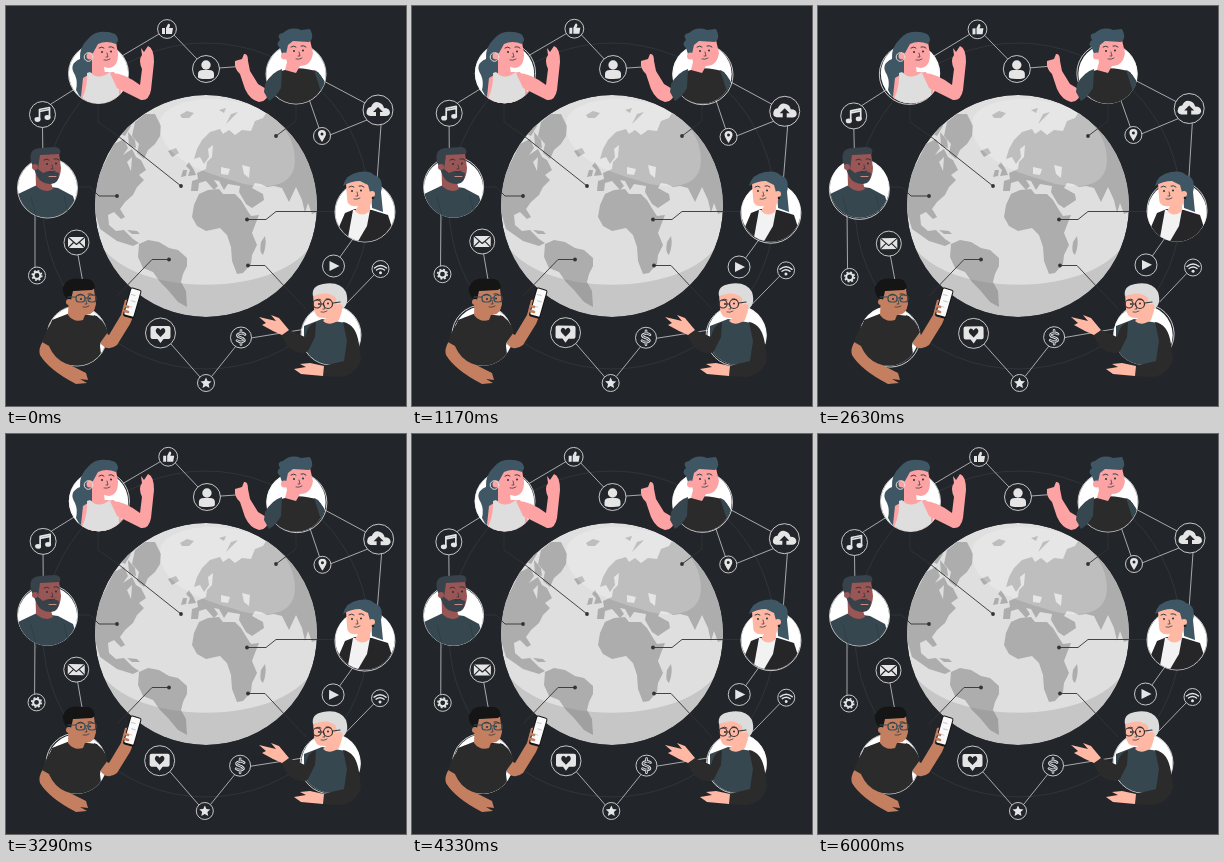
Write an HTML page that moves like this. It is 400x400 px and loops after 6.04 s.

```html
<!DOCTYPE html>
<html lang="en">
<head>
<meta charset="utf-8">
<title>Connected world</title>
<style>
html,body{margin:0;width:100%;height:100%;overflow:hidden;background:#22262b}
svg{display:block;width:100vw;height:100vh}
.line{fill:none;stroke:#333;stroke-width:.9}
.fine{fill:none;stroke-linecap:round;stroke-linejoin:round}
.pink{fill:#fda3a3}.peach{fill:#ffb8a4}.tan{fill:#c47f60}.brown{fill:#9a5555}
.slate{fill:#37474f}.hair{fill:#3f5764}.black{fill:#2b2b2b}.white{fill:#fff}
</style>
</head>
<body>
<svg viewBox="0 0 400 400">
<defs>
  <clipPath id="globe"><circle cx="200" cy="200" r="111"/></clipPath>
  <clipPath id="c1"><path d="M0 0H400V67.500H122.200A29.700 29.700 0 0 1 62.800 67.500H0Z"/></clipPath>
  <clipPath id="c2"><circle cx="290" cy="68" r="29.700"/></clipPath>
  <clipPath id="c3"><circle cx="41.500" cy="182" r="29.700"/></clipPath>
  <clipPath id="c4"><circle cx="359" cy="206" r="29.700"/></clipPath>
  <clipPath id="c5"><circle cx="71" cy="330" r="29.700"/></clipPath>
  <clipPath id="c6"><circle cx="325" cy="329" r="29.700"/></clipPath>
</defs>
<rect width="400" height="400" fill="#22262b"/>
<circle cx="200" cy="200" r="163" fill="none" stroke="#30353a"/>
<g id="orbitBack"></g>

<g clip-path="url(#globe)">
  <circle cx="200" cy="200" r="111" fill="#dfdfdf"/>
  <g fill="#adadad">
    <path d="M193 188L202 184 213 183 217 188 229 188 235 194 241 204 245 210 253 209 249 219 246 227 251 239 246 249 245 258 237 267 231 268 226 255 225 241 221 229 214 222 200 225 191 220 186 211 188 199Z"/>
    <path d="M255 236L259 230Q261 239 257 249 253 247 255 236Z"/>
    <path d="M133 238L142 234 153 236 163 242 172 244 181 252 181 260 177 268 175 276 180 285 181 301 172 296 162 284 154 276 147 266 137 262 132 251Z"/>
    <path d="M129 116L139 108 149 108 155 120 154 130 149 138 142 144 138 153 131 147 133 138 126 130Z"/>
    <path d="M108 138L118 133 122 142 117 149 126 143 130 151 135 154 140 164 133 169 138 174 131 181 127 189 119 196 114 203 119 211 115 213 108 206 102 209 103 219 110 225 118 224 127 233 133 237 127 240 111 235 94 223 87 200 92 170Z"/>
    <path d="M117 116L125 111 125 120 119 130 113 127ZM122 126L129 134 130 142 123 140Z"/>
    <path d="M188 153L191 143 196 134 204 126 214 123 217 128 223 124 229 129 236 124 245 125 249 115 257 112 262 104 278 106 300 132 315 160V205L306 208 302 197 299 207 296 194 290 181 283 196 276 182 268 180 261 181 255 178 249 177 246 182 257 188 258 194 246 202 240 198 233 186 234 180 222 178 218 184 213 175 208 174 212 180 208 184 200 175 193 177 192 185 185 185 186 175 192 173 191 167 200 163 201 156 206 151 207 139 202 143 203 151 198 158 194 151Z"/>
    <path d="M183 156L188 164 190 169 182 170 184 164 180 160ZM177 164L181 164 180 170 175 171ZM162 145L170 142 173 147 166 151ZM174 109L181 105 188 107 183 112 176 112ZM220 118L225 108 232 106 225 113ZM121 224L131 225 134 228 126 228ZM213 104L220 102 218 107Z"/>
  </g>
  <path d="M215 161L224 163 222 169 215 168ZM236 159L244 161 243 172 238 168ZM121 156L126 151 125 165Z" fill="#dfdfdf"/>
  <path d="M154 116C156 99 192 87 232 96 278 105 293 139 288 162 282 185 249 183 225 174 196 166 151 150 154 116Z" fill="#fff" opacity=".2"/>
  <path d="M88 224C106 297 294 297 312 224V320H88Z" fill="#777" opacity=".24"/>
</g>

<g class="line">
  <path d="M92 97V116L112 130 175 180M72 181H84L93 190H111M290 97V115L270 130M330 205.500H270L260 213.500H241M300 303L280 282 259 259.500H242M111 290L146 253.500H163"/>
  <g fill="#333" stroke="none" id="dots"></g>
</g>

<g class="white" id="discs"></g>
<g id="orbitRings"></g>

<!-- woman, top left -->
<g clip-path="url(#c1)">
  <path class="hair" d="M82 33Q89 24 101 26 112 27 112 35L92 50 88 70Q84 82 86 95 76 97 70 84 72 76 69 69 62 58 74 53 73 41 82 33Z"/>
  <path class="pink" d="M77 72L87 66 108 66 116 80 113 100H74Z"/>
  <path d="M81 67L84 66Q92 75 104 66L108 68 113 80V100H72Q82 85 81 67Z" fill="#dedede"/>
</g>
<path class="pink" d="M104 67Q117 66 134 79L136 63Q132 54 136 49L135 42 138 46 142 40Q148 42 148 56L145 84Q143 95 135 94L111 82Z"/>
<path class="pink" d="M86 41Q97 32 110 36L112 48Q112 61 103 62L98 61 99 68Q92 73 86 67Z"/>
<path class="hair" d="M82 52Q77 40 85 31 96 23 109 28 114 32 110 38 100 34 92 38L87 47Z"/>
<circle class="pink" cx="84" cy="50" r="3.500"/><circle cx="82.500" cy="51" r="4.300" class="fine" stroke="#ddd" stroke-width="1"/>

<!-- man, top right -->
<g clip-path="url(#c2)">
  <path class="black" d="M270 67Q290 58 312 66L320 78V100H264Z"/>
  <path class="slate" d="M308 64Q318 68 322 87L317 92Z"/>
</g>
<path class="pink" d="M229 55L236 53 238 48Q242 47 242 55L244 65 252 78 262 84Q263 95 253 96 244 94 239 83L234 68Q228 63 229 55Z"/>
<path class="slate" d="M276 63Q266 66 259 78L258 86 263 95Q270 91 275 82Z"/>
<path class="pink" d="M276 38Q290 30 304 34L307 47Q305 60 294 60L290 67 279 64 281 56Z"/>
<path class="hair" d="M274 42Q269 38 274 34 270 28 277 27 285 20 295 24L304 23Q309 32 303 36L287 35 282 39 280 48 276 48Z"/>
<circle class="pink" cx="278.500" cy="50" r="3.500"/>

<!-- man, left -->
<path class="slate" clip-path="url(#c3)" d="M8 215V190L31 179 52 182 67 190 75 215Z"/>
<path class="brown" d="M29 147H53L55 162Q54 177 45 177L47 183Q39 188 30 180Z"/>
<path d="M25 156Q22 142 35 142L48 141Q56 141 54 148L34 149 32 163 37 167Q44 163 53 167 53 178 45 178 35 178 31 170Z" fill="#37424b"/>
<circle class="brown" cx="29" cy="161" r="3"/><path d="M43 170.500H50" class="fine" stroke="#c98b7f"/>
<path d="M25 191L31 214M58 190L62 207" class="fine" stroke="#293d47" stroke-width=".7"/>

<!-- woman, right -->
<g clip-path="url(#c4)">
  <path class="hair" d="M364 168Q379 170 375 186L377 206 366 202Z"/>
  <path fill="#262628" d="M325 240L339 207 349 203 366 204 382 209 392 240Z"/>
  <path fill="#f2f2f2" d="M347 204L364 204 361 220 351 237H341Z"/>
</g>
<path class="peach" d="M340 177Q350 171 362 173L368 188 364 200 364 205Q356 212 349 205L352 200Q341 202 341 192Z"/>
<path class="hair" d="M337 180Q340 168 353 166 364 164 368 169 378 172 375 184L369 194 365 190 362 179 354 175Q345 175 337 180Z"/>
<circle class="peach" cx="366" cy="188" r="3"/><circle cx="367" cy="192" r="1.300" fill="#222"/>

<!-- man with phone -->
<path class="tan" d="M44 334L48 346 66 360 80 367 82 374 74 373 81 377 70 378Q43 364 34 349 32 343 37 335ZM95 325L103 329 115 309 119 294Q128 291 129 306L124 318 111 339Q102 346 95 338Z"/>
<path class="black" clip-path="url(#c5)" d="M46 314L64 307 91 310 97 323 94 340 97 365H40V330Z"/>
<path class="black" d="M55 311Q43 314 36 336L50 344ZM88 309Q97 312 102 326L94 337Z"/>
<path class="tan" d="M63 285L88 283 90 298Q88 310 79 309L77 314Q68 317 62 309Z"/>
<path d="M60 292Q54 283 59 278 63 271 77 273 87 271 89 281L86 284 67 285 65 294Z" fill="#151515"/>
<circle class="tan" cx="63" cy="296" r="3"/>
<g class="fine" stroke="#344f5b" stroke-width="1.200"><path d="M62 291H70M79 292H82"/><rect x="70" y="289" width="9" height="7" rx="3"/><rect x="82" y="289" width="8" height="7" rx="3"/></g>
<g transform="rotate(16 126 297)">
  <rect x="120.500" y="282" width="11.500" height="30" rx="2" fill="#151515"/><rect x="121.500" y="283" width="9.500" height="27" rx="1" fill="#fafafa"/>
  <path d="M123 289H127M125 295H129M123 301H127" class="fine" stroke="#c9c9c9"/>
</g>
<path d="M119 300L122 301M119 305L122 306" class="fine" stroke="#c47f60" stroke-width="2.600"/>

<!-- woman with glasses -->
<path class="slate" clip-path="url(#c6)" d="M298 320L316 313 340 317 347 333 344 362H298Z"/>
<path class="black" d="M310 316Q302 318 299 331L283 324 275 329 282 341Q296 351 302 345L309 331ZM337 316Q350 318 353 338L355 354Q349 370 333 371L316 370 317 360 338 355 341 335Z"/>
<path class="peach" d="M283 324L273 312 265 309 270 315 253 311 260 317 256 319 267 325 276 329ZM318 360L304 357 294 358 300 361 288 363 295 368 317 370Z"/>
<path class="peach" d="M307 288Q320 280 334 286L336 305 333 314Q323 321 317 315L320 312Q308 313 308 302Z"/>
<path d="M307 290Q305 280 317 278 334 275 340 286 344 299 335 304L331 301 330 292Q322 284 307 290Z" fill="#dcdcdc"/>
<circle class="peach" cx="333.500" cy="301" r="3"/>
<g class="fine" stroke="#333" stroke-width="1.200"><circle cx="311" cy="298" r="4"/><circle cx="322" cy="298" r="4.500"/><path d="M315 298H317M327 297L334 296"/></g>
<g id="faces"></g>

<g id="orbitFront"></g>
</svg>
<script>
const byId = id => document.getElementById(id);
const circle = (x, y, r, extra = "") => `<circle cx="${x}" cy="${y}" r="${r}" ${extra}/>`;

byId("dots").innerHTML = [[175,180],[111,190],[270,130],[241,213.5],[242,259.5],[163,253.5]]
  .map(([x, y]) => circle(x, y, 1.9)).join("");

byId("orbitBack").innerHTML = `<path class="fine" stroke="#c8c9ca" stroke-width=".8" d="
  M116 50L153 28M168 29L191 53M213 62L240 60M45 98L72 81M36.500 121L37 156M29 205V261
  M72 249L77 277M165 338L194 371M206 370L230 340M245 332L300 323M368 269L341 297
  M334 251L349 230M375 119L371 175M312 72L361 98M324 129L361 114M313 122L302 90"/>`;

// Each portrait has a still disc and a swaying outline
const portraits = [[92.5,67.5],[290,68],[41.5,182],[359,206],[71,330],[325,329]];
byId("discs").innerHTML = portraits.map(([x, y]) => circle(x, y, 29.7)).join("");
byId("orbitRings").innerHTML = portraits
  .map(([x, y]) => circle(x, y, 30, 'fill="none" stroke="#f4f4f4" stroke-width=".8"')).join("");

// Eyes, brows, nose and mouth around the middle of a face
const face = (x, y, ink = "#263238") => `<g transform="translate(${x} ${y})">
  ${circle(-4, 0, 1, `fill="${ink}"`)}${circle(5, -.5, 1, `fill="${ink}"`)}
  <g class="fine" stroke="${ink}" stroke-width=".9"><path d="M-7-4Q-4-6-2-4M3-5Q6-6 8-4"/>
  <path d="M1 1L2 5H0M-2 8Q1 9 4 7" stroke-width=".7"/></g></g>`;
byId("faces").innerHTML = face(100, 46) + face(292, 45) + face(45, 158) +
  face(350, 185) + face(79, 293) + face(317, 298);

// Glyphs are drawn around their own centre
const glyphs = [
  [161, 23, 9.4, '<path d="M-5-1H-2V5H-5ZM-1-1L1-5Q3-6 3-3L2-1H6L5 5H-1Z"/>'],
  [200, 63, 13.5, circle(0, -4, 4.7) + '<path d="M-8 8V5Q-8 1-3 1H3Q8 1 8 5V8Q8 10 0 10-8 10-8 8Z"/>'],
  [36.5, 108.5, 13, '<path class="fine" d="M-3 5V-5L7-7V3M-3-3L7-5" stroke="#e5e5e5" stroke-width="1.700"/><ellipse cx="-5" cy="5" rx="3" ry="2.400"/><ellipse cx="5" cy="3" rx="3" ry="2.400"/>'],
  [372, 104, 15, '<path d="M-8 6Q-13 5-11 0-10-3-7-3-4-10 2-7 5-6 6-2 12-2 12 3 11 6 8 6Z"/><path d="M0-3L5 2H2V7H-2V2H-5Z" fill="#22262b"/>'],
  [316, 130, 8.5, '<path fill-rule="evenodd" d="M0 6Q-4 0-4-2A4 4 0 0 1 4-2Q4 0 0 6ZM-1.500-2A1.500 1.500 0 0 0 1.500-2 1.500 1.500 0 0 0-1.500-2Z"/>'],
  [70.5, 236.5, 12.5, '<rect x="-8.500" y="-5.500" width="17" height="11" rx="1"/><path class="fine" d="M-8-5L0 2 8-5M-8 5L-3 0M8 5L3 0" stroke="#22262b" stroke-width="1.100"/>'],
  [31, 269.5, 8.5, circle(0, 0, 3.4, 'fill="none" stroke="#e5e5e5" stroke-width="2"') +
    circle(0, 0, 4.8, 'fill="none" stroke="#e5e5e5" stroke-width="1.600" stroke-dasharray="1.885"')],
  [154.5, 327, 15, '<path d="M-8-7H8Q10-7 10-5V4Q10 6 8 6H3L0 10-3 6H-8Q-10 6-10 4V-5Q-10-7-8-7Z"/><path d="M0 4L-4 0Q-6-3-3-5-1-5 0-3 1-5 3-5 6-3 4 0Z" fill="#22262b"/>'],
  [235, 331.5, 10.5, ["#e5e5e5", "#22262b"].map((ink, i) =>
    `<path class="fine" d="M4-3Q2-5-1-4-5-3-3-1L2 1Q5 3 2 4-1 5-4 3M0-7V-5M0 5V7" stroke="${ink}" stroke-width="${2.6 - i * 1.8}"/>`).join("")],
  [200, 377, 8.5, '<path d="M0-5.500L1.600-2 5.500-1.600 2.600 1 3.500 5 0 3-3.500 5-2.600 1-5.500-1.600-1.600-2Z"/>'],
  [327.5, 260, 11, '<path d="M-4-5L6 0-4 5Z"/>'],
  [374.5, 263, 8.5, '<path class="fine" d="M-6-1Q0-6 6-1M-4 1Q0-2 4 1" stroke="#e5e5e5" stroke-width="1.400"/>' + circle(0, 3.7, 1.5)]
];
byId("orbitFront").innerHTML = glyphs.map(([x, y, r, art]) =>
  `<g transform="translate(${x} ${y})" fill="#e5e5e5">` +
  circle(0, 0, r, 'fill="#22262b" stroke="#d8d8d8" stroke-width=".9"') + art + "</g>").join("");

const LOOP = 6040, SWING = 3000;
const orbits = ["orbitBack", "orbitRings", "orbitFront"].map(byId);

// Linear sway: 0 → 1 → -1 → 0 degrees
function sway(phase) {
  if (phase < .25) return phase * 4;
  return phase < .75 ? 2 - phase * 4 : phase * 4 - 4;
}

function draw(ms) {
  const t = Math.min(ms % LOOP, 2 * SWING);
  const angle = sway(t % SWING / SWING);
  for (const orbit of orbits) orbit.setAttribute("transform", `rotate(${angle} 200 200)`);
}

const start = performance.now();
function tick() {
  draw(performance.now() - start);
  requestAnimationFrame(tick);
}
tick();
</script>
</body>
</html>
```
